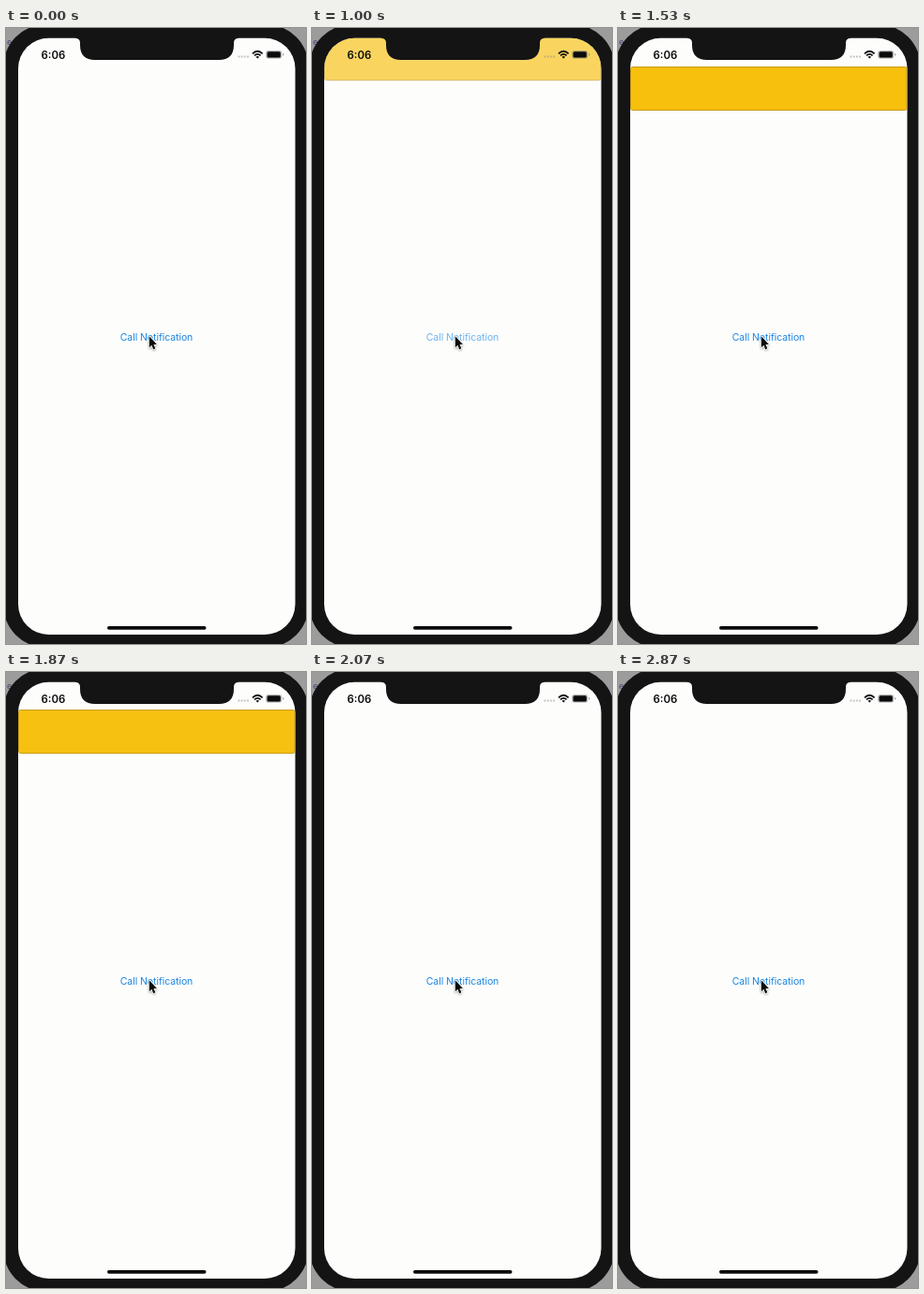
These frames come from a looping animation (320x656 px, 2.94 s). An HTML page:

```html
<!DOCTYPE html>
<html lang="en">
<head>
<meta charset="utf-8">
<title>Call Notification</title>
<style>
  html, body { margin: 0; width: 100%; height: 100%; overflow: hidden; background: #9c9c9c; }
  svg { display: block; width: 320px; height: 656px; }
  text { font-family: Inter, Roboto, sans-serif; }
  .body { fill: #141415; }
  .ink { fill: #0b0b0c; }
  .time { font-size: 11.4px; font-weight: 600; }
  .link { font-size: 10.5px; letter-spacing: -.07px; fill: #1a86e4; text-anchor: middle; }
  .link, .banner { animation: press 2940ms step-end infinite; }
  .banner { animation-name: banner; stroke: #c99a10; fill: #f7c00c; }
  .pointer { filter: drop-shadow(.6px 1.2px .8px #0005); }

  /* The picture advances at 15 steps per second. */
  @keyframes press {
    0%     { opacity: 1; }
    27.1%  { opacity: .7; }
    29.5%  { opacity: .35; }
    31.6%  { opacity: .4; }
    33.95% { opacity: .62; }
    36.3%  { opacity: .85; }
    38.4%  { opacity: 1; }
  }
  @keyframes banner {
    0%     { transform: translateY(-88px); opacity: 0; }
    31.6%  { transform: translateY(-77px); opacity: .13; }
    33.95% { transform: translateY(-32px); opacity: .65; }
    36.3%  { transform: translateY(-12px); opacity: .87; }
    38.4%  { transform: translateY(-2px); opacity: .98; }
    40.75% { transform: none; opacity: 1; }
    63.5%  { transform: translateY(-1px); opacity: .98; }
    65.6%  { transform: translateY(-12px); opacity: .9; }
    68%    { transform: translateY(-41px); opacity: .55; }
    70.35% { transform: translateY(-88px); opacity: 0; }
  }
</style>
</head>
<body>
<svg viewBox="0 0 320 656">
  <defs>
    <clipPath id="screen"><rect x="13" y="10.7" width="295.5" height="635.3" rx="32.5"/></clipPath>
  </defs>

  <text x="1" y="18" font-size="9" fill="#4c4873">e</text>
  <rect class="body" x="-3" y="-4" width="326" height="664" rx="46"/>

  <g clip-path="url(#screen)">
    <rect width="320" height="656" fill="#fdfdfc"/>
    <text class="link" x="160.5" y="332.6">Call Notification</text>
    <rect class="banner" x="13.5" y="41.5" width="294.5" height="46" rx="2"/>
  </g>

  <!-- notch -->
  <path class="body" d="M74 10V10.7Q79 11 79 16V18Q79 34 95 34H227Q243 34 243 18V16Q243 11 248 10.7V10Z"/>

  <!-- status bar -->
  <text class="time ink" x="37.5" y="32.5">6:06</text>
  <path d="M247.5 30.5H259" stroke="#888" stroke-opacity=".5" stroke-width="1.8" stroke-dasharray="1.8 1.4"/>
  <path d="M263 27.3Q268.3 22.3 273.6 27.3M265 29.4Q268.3 26.4 271.6 29.4"
        fill="none" stroke="#0b0b0c" stroke-width="1.8"/>
  <path class="ink" d="M266.5 30.7Q268.3 29.3 270.1 30.7L268.3 32.6Z"/>
  <g fill="#777" fill-opacity=".55">
    <rect x="277.3" y="24" width="16.8" height="8.6" rx="2.6"/>
    <path d="M295 26.8V29.8Q296.4 29.4 296.4 28.3T295 26.8Z"/>
  </g>
  <rect class="ink" x="278.6" y="25.2" width="14.2" height="6.2" rx="1.5"/>

  <rect class="ink" x="108" y="637" width="105.5" height="3.7" rx="1.85"/>

  <path class="pointer ink" d="M152.8 328.2V340.2L155.4 337.8L157.2 342.2L159.3 341.3L157.5 337H160.9Z"
        stroke="#fdfdfc" stroke-width="1.4" stroke-linejoin="round" paint-order="stroke"/>
</svg>
</body>
</html>
```
